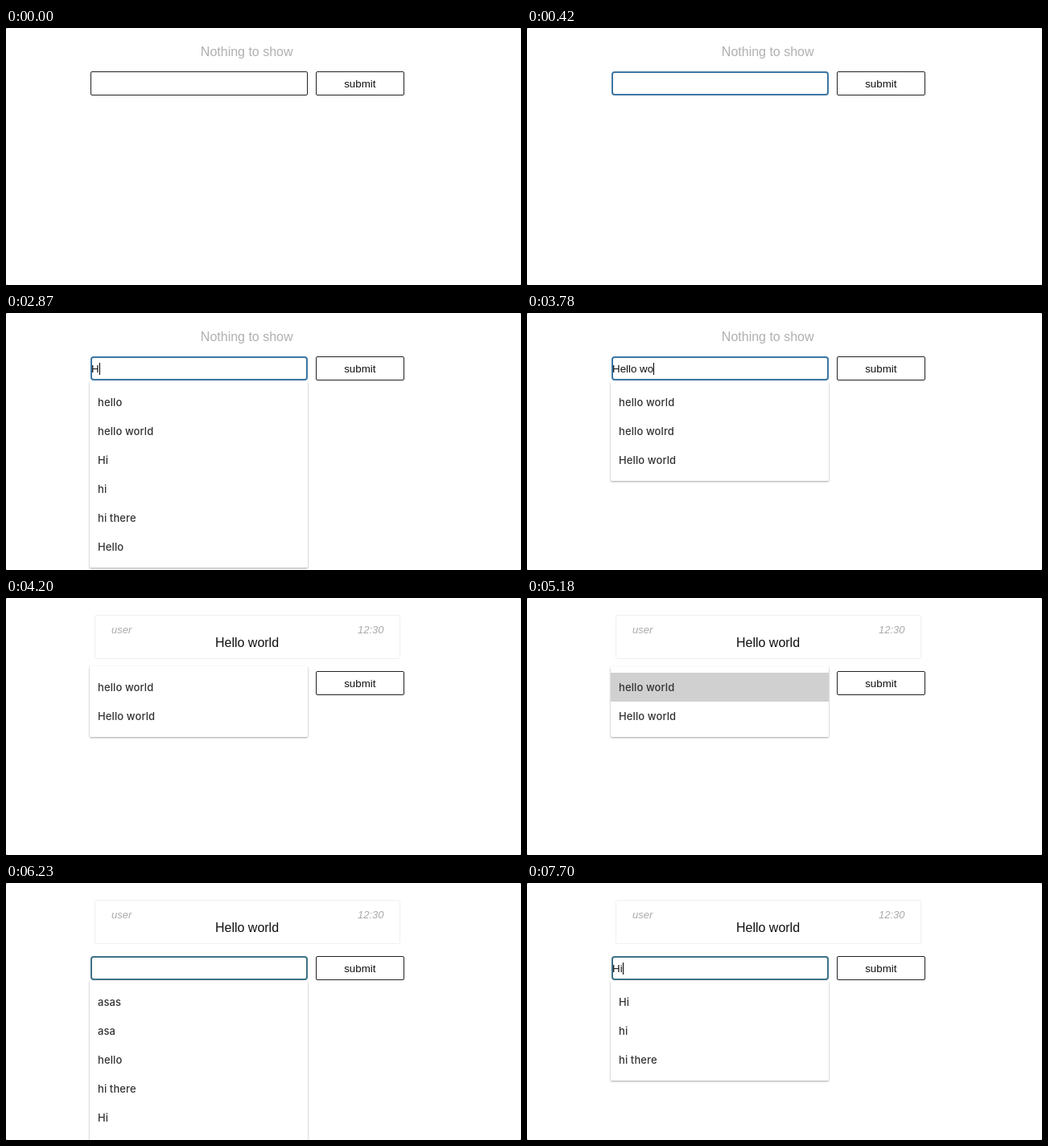
These frames come from a looping animation (640 px wide and 320 px high, 8000 ms). An HTML page:

```html
<!DOCTYPE html>
<html lang="en">
<head>
<meta charset="utf-8">
<title>Message form</title>
<style>
  html, body { margin: 0; width: 100%; height: 100%; overflow: hidden; background: #aaa; }
  svg { display: block; width: 640px; height: 320px; }
  text { font-family: "Liberation Sans", Arial, sans-serif; font-size: 13.333px; fill: #111; white-space: pre; }
  .title { font-size: 16px; text-anchor: middle; }
  .empty { fill: #b0b0b0; }
  .meta { font-size: 13px; font-style: italic; fill: #aaa; }
  .option { font-family: Inter, Roboto, sans-serif; font-size: 13px; font-weight: 500; letter-spacing: .1px; fill: #333; }
  .field { fill: #fff; stroke: #222; }
  .focused { stroke-width: 2; }
  .card { fill: #fff; stroke: #f0f0f0; }
  .list { fill: #fff; filter: drop-shadow(0 1px 1.2px rgba(0, 0, 0, .36)); }
</style>
</head>
<body>
<svg id="stage" viewBox="0 0 640 320"></svg>
<script>
const LOOP = 8000;
const ROW = 36;
const RECENT = ["asas", "asa", "hello", "hi there", "Hi", "hi"];
const HISTORY = ["hello", "hello world", "Hi", "hi", "hi there", "Hello", "hello wolrd", "Hello world"];

// Each step overrides part of the state from its time on.
const STEPS = [
  [0, { typed: "", focus: false, open: false, sent: false, hover: false }],
  [420, { focus: true }],
  [1890, { open: true }],
  [2870, { typed: "H" }],
  [3010, { typed: "He" }],
  [3080, { typed: "Hel" }],
  [3290, { typed: "Hell" }],
  [3430, { typed: "Hello" }],
  [3570, { typed: "Hello " }],
  [3640, { typed: "Hello w" }],
  [3780, { typed: "Hello wo" }],
  [3850, { typed: "Hello wor" }],
  [3920, { typed: "Hello worl" }],
  [3990, { typed: "Hello world" }],
  [4200, { sent: true, stale: true }],
  [5180, { hover: true }],
  [5460, { hover: false }],
  [5740, { typed: "", open: false, stale: false }],
  [6230, { open: true }],
  [7350, { typed: "H" }],
  [7630, { typed: "Hi" }]
];

const stage = document.getElementById("stage");
const measure = document.createElement("canvas").getContext("2d");
measure.font = '13.333px "Liberation Sans", Arial, sans-serif';

const rect = (x, y, w, h, attrs = "") =>
  `<rect x="${x}" y="${y}" width="${w}" height="${h}" ${attrs}/>`;
const text = (x, y, content, attrs = "") =>
  `<text x="${x}" y="${y}" ${attrs}>${content}</text>`;

function header(sent) {
  if (!sent) return text(299.2, 35, "Nothing to show", 'class="title empty"');
  return rect(110.5, 21.5, 379, 54, 'rx="2" class="card"') +
    text(131, 44, "user", 'class="meta"') +
    text(469.5, 44, "12:30", 'class="meta" text-anchor="end"') +
    text(299.5, 61, "Hello world", 'class="title"');
}

function input(y, { typed, focus, sent }) {
  const ring = sent ? "#3f7187" : "#3d76a3";
  let out = focus
    ? rect(106, y + 1, 268, 28, `rx="3" class="field focused" style="stroke:${ring}"`)
    : rect(105.5, y + .5, 269, 29, 'rx="1.5" class="field"');
  if (typed) {
    const caret = Math.round(106 + measure.measureText(typed).width);
    out += text(106, y + 20, typed) + rect(caret, y + 8, 1, 15);
  }
  return out;
}

function suggestions(y, { typed, hover }) {
  const query = typed.toLowerCase();
  const options = query
    ? HISTORY.filter(item => item.toLowerCase().startsWith(query)).slice(0, 6)
    : RECENT;
  return rect(104, y, 271, options.length * ROW + 16, 'rx="1.5" class="list"') +
    (hover ? rect(104, y + 8, 271, ROW, 'fill="#d0d0d0"') : "") +
    options.map((item, i) => text(114, y + 31 + i * ROW, item, 'class="option"')).join("");
}

function render(state) {
  const y = state.sent ? 91 : 54;
  const listY = state.sent && !state.stale ? 122 : 85;
  stage.innerHTML = rect(0, 0, 640, 320, 'rx="2.5" fill="#fff"') +
    header(state.sent) +
    input(y, state) +
    rect(385.5, y + .5, 109, 29, 'rx="1.5" class="field"') +
    text(439.8, y + 20, "submit", 'text-anchor="middle"') +
    (state.open ? suggestions(listY, state) : "");
}

let shown = 0;
function tick() {
  const time = performance.now() % LOOP;
  const count = STEPS.filter(([start]) => start <= time).length;
  if (count !== shown) {
    shown = count;
    render(Object.assign({}, ...STEPS.slice(0, count).map(([, change]) => change)));
  }
  requestAnimationFrame(tick);
}
tick();
</script>
</body>
</html>
```
